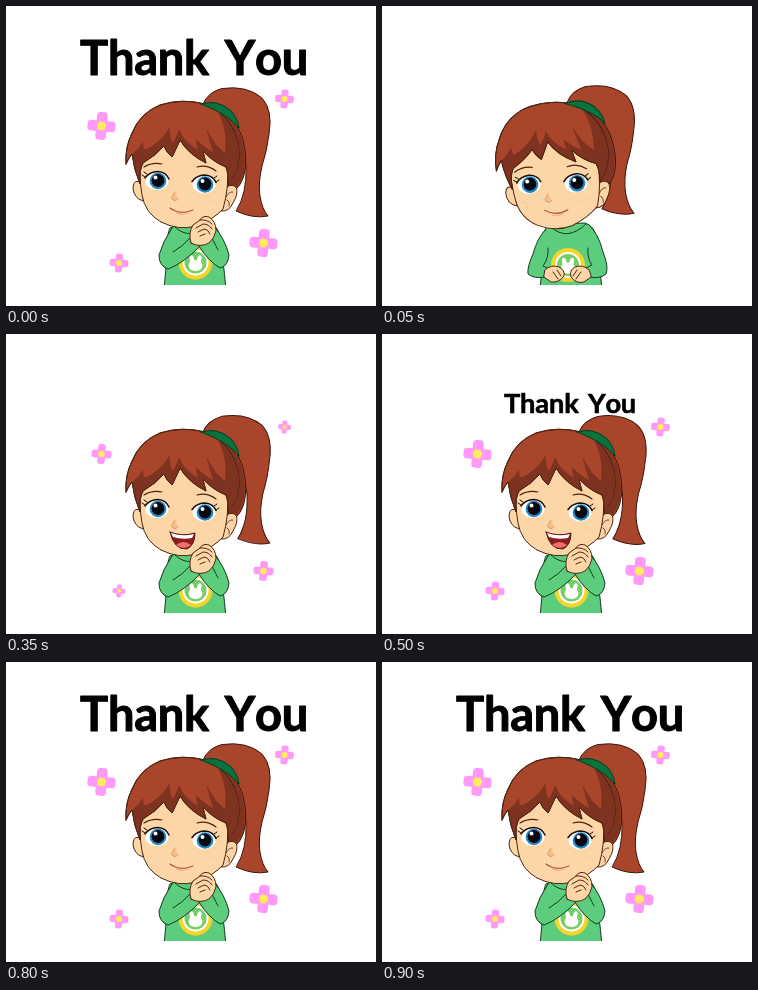
Animation of 370 by 300 pixels, one loop 1000 ms. Source, as an HTML page:

```html
<!DOCTYPE html>
<html lang="en">
<head>
<meta charset="utf-8">
<title>Thank You</title>
<style>
  html, body { margin: 0; width: 100%; height: 100%; overflow: hidden; background: #fff; }
  svg { display: block; width: 370px; height: 300px; }
  path, ellipse, circle { stroke-linecap: round; stroke-linejoin: round; }
  .hair { fill: #a9452a; stroke: #3d160b; }
  .shade { fill: #7d3320; }
  .skin { fill: #fdd6a8; stroke: #4d2513; }
  .shirt { fill: #5ccd7d; stroke: #123d24; }
  .line { fill: none; stroke: #4d2513; }
  .fold { fill: none; stroke: #123d24; }
  .lid { fill: none; stroke: #1c0d08; stroke-width: 1.5; }
  .lash { fill: none; stroke: #1c0d08; }
  .brow { fill: none; stroke: #4d2010; stroke-width: 1.2; }
  text {
    font: 700 47px Lato, "Open Sans", sans-serif; font-kerning: none; letter-spacing: -.3px; word-spacing: 5px;
    text-anchor: middle; stroke: #000; stroke-width: 1; stroke-linejoin: round;
  }
</style>
</head>
<body>
<svg viewBox="0 0 370 300">
  <defs>
    <g id="eye">
      <ellipse rx="11.500" ry="9" fill="#fff"/>
      <circle cx="1" r="8.300" fill="#2488c4"/>
      <circle cx="1" cy="-.5" r="6.400" fill="#07080e"/>
      <circle cx="-1.500" cy="-3.500" r="2" fill="#fff"/>
      <path class="lid" d="M-12-3Q-8-9 1-9.500Q9-9 12-2"/>
    </g>
    <g id="flower">
      <g id="petals" fill="#ff99fa"></g>
      <circle r=".16" fill="#ffee55"/>
    </g>
  </defs>

  <g id="flowers"></g>

  <g id="back">
    <g id="tail">
      <path class="hair" d="M197 98Q202 86 216 82.500Q241 79 256 92Q267 104 263 128Q261 145 256 160Q252 177 254 190Q256 203 262 210Q247 213 230 205Q241 188 240 160L231 118Z"/>
    </g>
  </g>

  <g id="torso">
    <path class="shirt" d="M164 222Q172 218 180 218L203 217Q211 220 213 227Q217 250 220 284H158Q161 254 162 229Z"/>
    <path class="fold" d="M169 221Q185 236 204 218"/>
    <path d="M157 279H222V286H157Z" fill="#fff"/>
  </g>
  <g id="badge">
    <circle r="17" fill="#f5d52c"/>
    <circle r="13" fill="#fff"/>
    <circle r="11" fill="#74cf68"/>
    <g fill="#fff">
      <ellipse cy="3" rx="7" ry="5.500"/>
      <ellipse cx="-3" cy="-3" rx="2.200" ry="5" transform="rotate(-12)"/>
      <ellipse cx="3" cy="-3" rx="2.200" ry="5" transform="rotate(12)"/>
    </g>
  </g>

  <g id="head">
    <path class="hair" d="M197 98Q228 104 237 134Q242 155 238 169Q235 181 226 186L212 188V120Z"/>
    <path class="shade" d="M212 106Q230 112 236 135Q241 155 237 169Q234 180 226 185L212 187Z"/>
    <path class="skin" d="M136 177Q128 172 127 181Q127 192 137 195Z"/>
    <path class="skin" d="M217 185Q224 176 230 181Q233 187 227 197Q223 206 215 205Z"/>
    <path class="line" d="M220 191Q223 185 227 186M221 194Q224 195 223 200" stroke-width=".8"/>
    <path class="skin" d="M134 150Q133 172 136 189Q139 207 155 216Q173 225 190 220Q208 213 217 203Q223 183 222 155L180 125Z"/>
    <path class="hair" d="M120 158Q119 141 126 127Q134 107 154 99Q176 92 199 98Q225 108 232 137Q237 160 222 179Q223 168 220 161Q207 156 197 145Q198 150 200 157Q182 148 174 134Q170 143 166 151Q160 146 158 140Q149 150 137 157Q133 164 134 178Q128 164 126 148Q122 153 120 158Z" stroke="none"/>
    <path class="shade" d="M126 148Q132 144 137 136Q137 141 139 144Q154 137 164 121Q163 129 166 137Q171 131 173 123Q179 137 192 144Q190 138 190 133Q199 142 207 146Q203 134 200 121Q207 138 219 147Q222 125 212 106Q226 116 232 137Q237 160 222 179Q223 168 220 161Q207 156 197 145Q198 150 200 157Q182 148 174 134Q170 143 166 151Q160 146 158 140Q149 150 137 157Q133 164 134 178Q128 164 126 148Z"/>
    <path class="line" d="M222 179Q223 168 220 161Q207 156 197 145Q198 150 200 157Q182 148 174 134Q170 143 166 151Q160 146 158 140Q149 150 137 157Q133 164 134 178Q128 164 126 148Q122 153 120 158Q119 141 126 127Q134 107 154 99Q176 92 199 98"/>
    <path d="M195 98Q211 93 224 104Q232 112 233 122Q222 108 195 98Z" fill="#08733d" stroke="#063c20"/>
    <path class="brow" d="M138 161Q146 156 156 158M191 161Q201 158 210 165"/>
    <use href="#eye" x="151" y="175"/>
    <use href="#eye" x="198" y="178.500"/>
    <path class="lash" d="M139 171L136 169M141 168L138 166M210 176L213 174M208 172L211 170"/>
    <path d="M169 186Q165 191 166 193Q169 196 172 193" fill="#f9bf8a" stroke="#d98f5c" stroke-width=".8"/>
    <g fill="#efb98c">
      <circle cx="145" cy="192" r=".7"/><circle cx="150" cy="194" r=".7"/><circle cx="147" cy="197" r=".7"/>
      <circle cx="196" cy="196" r=".7"/><circle cx="202" cy="197" r=".7"/><circle cx="207" cy="195" r=".7"/>
    </g>
    <g class="mouth">
      <path d="M164 202Q174 209.500 187 204" fill="none" stroke="#b35a3c" stroke-width="1.200"/>
      <path d="M171 207.500Q177 210 182 207" fill="none" stroke="#eea68a"/>
    </g>
    <g class="mouth">
      <path d="M164 198Q176 203 189 199Q189 211 181 215Q168 216 164 198Z" fill="#8c1e20" stroke="#5a1a14"/>
      <path d="M165 199Q176 203 188 200L186 204Q176 206 167 203Z" fill="#fff"/>
      <path d="M170 211Q177 205 185 211Q178 217 170 211Z" fill="#f56d6b"/>
    </g>
    <g class="mouth">
      <path d="M168 205Q171 197 177 198Q183 199 184 208Q183 215 176 215Q168 214 168 205Z" fill="#8c1e20" stroke="#5a1a14"/>
      <path d="M171 202Q176 197 182 203L180 205Q175 203 171 204Z" fill="#fff"/>
      <path d="M170 211Q177 206 183 211Q177 217 170 211Z" fill="#f56d6b"/>
    </g>
  </g>

  <g class="arms">
    <path class="shirt" d="M163 224Q155 233 151 248Q145 261 146 268Q152 273 163 271L165 262L161 260Q167 252 166 242"/>
    <path class="shirt" d="M206 218Q217 228 221 246Q227 261 224 268Q218 273 207 271L204 262L210 259Q205 252 206 242"/>
    <path class="skin" d="M163 264Q169 258 177 261Q183 264 182 270Q177 277 169 276L162 271Z"/>
    <path class="skin" d="M207 264Q201 258 193 261Q187 264 189 271Q194 278 202 276L209 271Z"/>
    <path class="line" d="M175 264L179 270M171 266L176 273M195 264L191 270M199 266L194 273"/>
  </g>
  <g class="arms">
    <path class="shirt" d="M163 224Q155 234 151 250Q149 260 155 264Q166 264 177 258L173 247L164 250Q167 243 166 238"/>
    <path class="shirt" d="M206 218Q218 228 222 248Q225 260 218 264Q207 263 198 257L201 246L209 250Q206 243 206 238"/>
    <path class="skin" d="M174 246Q179 239 187 240Q192 235 196 240Q202 244 200 253Q196 259 186 257Q178 260 174 253Z"/>
    <path class="line" d="M178 245Q185 242 194 243M179 249Q187 246 195 247M181 253Q187 250 195 251"/>
  </g>
  <g class="arms">
    <path class="shirt" d="M166 222Q157 235 153 249Q153 260 162 263Q178 257 194 240L184 232Q176 241 167 246"/>
    <path class="shirt" d="M208 220Q219 233 223 249Q222 260 214 262Q202 255 193 240L206 232Q210 240 212 244"/>
    <path class="skin" d="M185 237Q182 227 187 219L194 214Q197 209 203 211Q210 215 210 225Q208 233 203 237Q194 242 185 237Z"/>
    <path class="line" d="M194 214Q201 213 206 218M190 222L197 218Q203 218 206 223M192 226L198 223Q202 223 204 228M194 230L199 228"/>
  </g>

  <text id="words">Thank You</text>
</svg>
<script>
const $ = id => document.getElementById(id);
const all = name => [...document.querySelectorAll(name)];
const draw = (el, transform) => el.setAttribute("transform", transform);
const only = (els, i) => els.forEach((el, n) => el.style.display = n === i ? "" : "none");

const mouths = all(".mouth"), armSets = all(".arms");
const spots = [[95.5, 120], [257.5, 237], [278.5, 93], [113, 257]];

$("petals").innerHTML = [5, 95, 185, 275].map(a =>
  `<rect x="-.19" y="-.5" width=".38" height=".44" rx=".13" transform="rotate(${a})"/>`).join("");
$("flowers").innerHTML = spots.map(() => '<use href="#flower"/>').join("");
const flowers = [...$("flowers").children];

// start, head tilt, tail swing, arms, mouth, text scale, sizes of both flower pairs
const poses = [
  [0, 0, 0, 2, 0, 1, 28, 19],
  [50, -6, 5, 0, 0, 0, 0, 0],
  [200, -4, 3.5, 1, 0, 0, 12, 0],
  [350, 0, -1, 2, 1, 0, 20, 13],
  [500, 0, -.5, 2, 1, .58, 28, 19],
  [650, 0, 0, 2, 2, .795, 20, 26],
  [800, 0, 0, 2, 0, 1, 28, 19]
];
const badges = [[186, 259], [187, 258], [189.5, 256.5]];

function show(now) {
  const t = now % 1000;
  const [, tilt, swing, arms, mouth, scale, big, small] = poses.findLast(p => p[0] <= t);
  const turn = `rotate(${tilt} 185 215)`;
  draw($("head"), turn);
  draw($("back"), turn);
  draw($("tail"), `rotate(${swing} 208 103)`);
  draw($("badge"), `translate(${badges[arms]})`);
  only(mouths, mouth);
  only(armSets, arms);
  draw($("words"), `translate(188 ${92 - 23 * scale}) scale(${scale})`);
  flowers.forEach((f, i) => draw(f, `translate(${spots[i]}) scale(${i < 2 ? big : small})`));
  requestAnimationFrame(show);
}
requestAnimationFrame(show);
</script>
</body>
</html>
```
